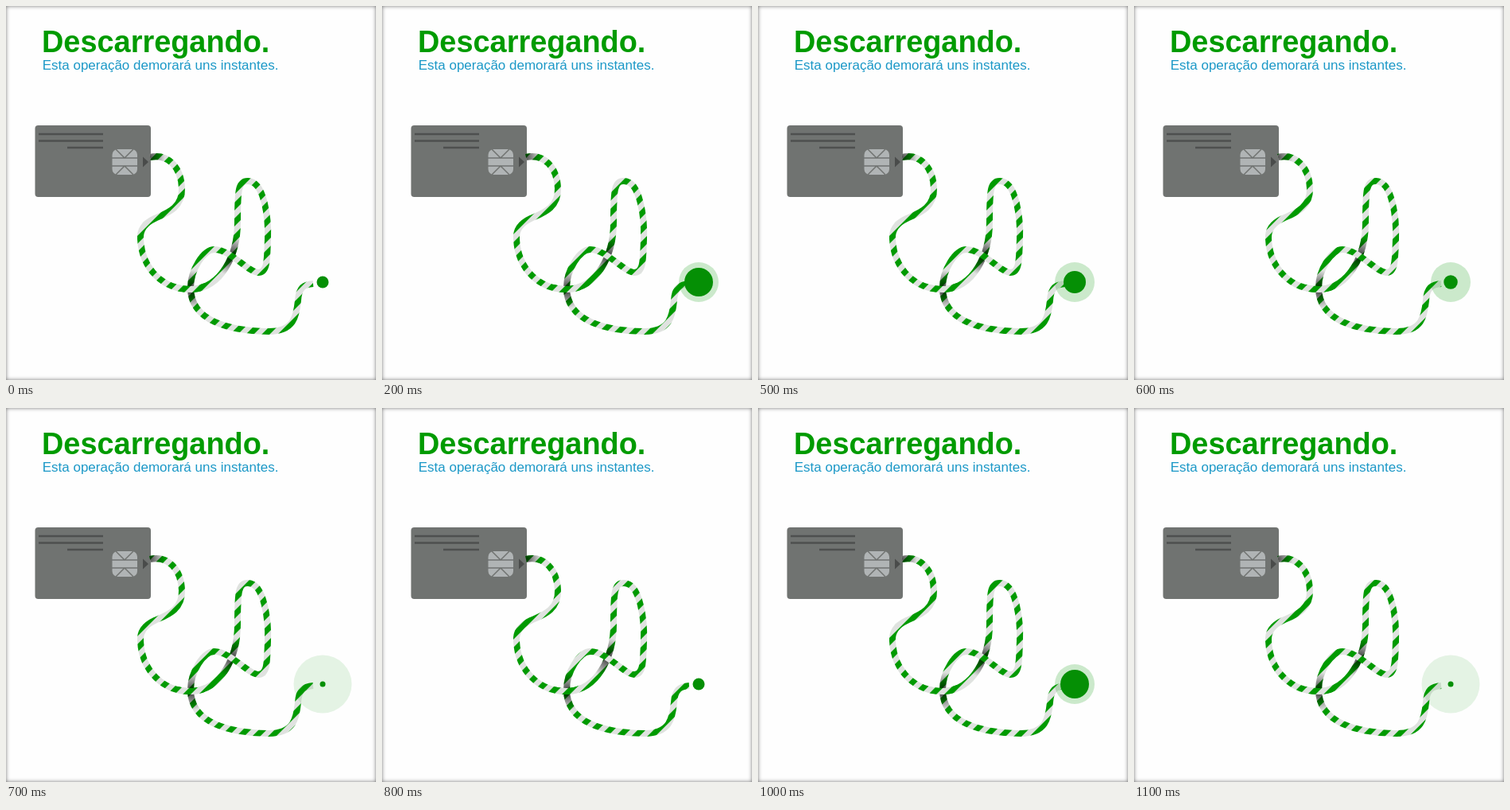
An HTML page for the animation above (1.2 s loop, 465x470 px).

```html
<!DOCTYPE html>
<html lang="pt">
<head>
<meta charset="utf-8">
<title>Descarregando</title>
<style>
html, body { margin: 0; width: 100%; height: 100%; overflow: hidden; background: #fefefe; }
svg, .edge { position: absolute; left: 0; top: 0; width: 465px; height: 470px; }
.edge { box-shadow: inset 0 0 5px rgba(0,0,0,.55); }
text { font-family: "Liberation Sans", Arial, sans-serif; }
.rope { fill: none; stroke-width: 8; }
</style>
</head>
<body>
<svg viewBox="0 0 465 470">
  <defs>
    <!-- Diagonal stripes, fixed to the stage and seen through the rope -->
    <linearGradient id="stripes" gradientUnits="userSpaceOnUse" x2="10" y2="10" spreadMethod="repeat">
      <stop offset=".23" stop-color="#dfe2df"/>
      <stop offset=".27" stop-color="#009a00"/>
      <stop offset=".73" stop-color="#009a00"/>
      <stop offset=".77" stop-color="#dfe2df"/>
    </linearGradient>
    <radialGradient id="shadeCard" gradientUnits="userSpaceOnUse" cx="181" cy="190" r="19">
      <stop stop-opacity=".65"/><stop offset="1" stop-opacity="0"/>
    </radialGradient>
    <radialGradient id="shadeLoop" gradientUnits="userSpaceOnUse" cx="284" cy="314" r="25">
      <stop stop-opacity=".75"/><stop offset="1" stop-opacity="0"/>
    </radialGradient>
    <radialGradient id="shadeCross" gradientUnits="userSpaceOnUse" cx="233" cy="356" r="24">
      <stop stop-opacity=".75"/><stop offset="1" stop-opacity="0"/>
    </radialGradient>
    <path id="head" d="M181 190C204 185 220 203 221 229S200 261 187 267S168 281 169 293
      C171 331 198 357 234 356C270 354 291 314 291 272S292 219 305 220"/>
    <path id="tail" d="M304 220C325 220 330 268 329 293S329 335 317 335S282 306 262 306
      C248 306 232 332 232 354C232 396 280 408 330 409C362 409 365 390 367 370C368 354 374 350 386 349"/>
    <clipPath id="crossing"><rect x="216" y="340" width="34" height="24"/></clipPath>
  </defs>

  <text x="45" y="58" font-size="37.9" font-weight="bold" fill="#009b00">Descarregando.</text>
  <text x="45.7" y="80" font-size="17" fill="#1b98c7">Esta operação demorará uns instantes.</text>

  <rect x="36.5" y="150" width="145.5" height="90" rx="4" fill="#707371"/>
  <path d="M41 161H122M41 169.5H122M77 178H122" stroke="#4e504f" stroke-width="2.4"/>
  <rect x="133.5" y="180" width="31.5" height="32" rx="7" fill="#b0b4b5"/>
  <path d="M133 191H165M133 201H165M138 180L149 191L160 180M138 212L149 201L160 212" fill="none" stroke="#707371" stroke-width="1.5"/>
  <path d="M172 189.5L179 196L172 202.5Z" fill="#4a4c4b"/>

  <g class="rope">
    <use href="#head" stroke="url(#stripes)"/>
    <use href="#head" stroke="url(#shadeCard)"/>
    <use href="#head" stroke="url(#shadeLoop)"/>
    <use href="#tail" stroke="url(#stripes)"/>
    <use href="#tail" stroke="url(#shadeCross)"/>
    <g clip-path="url(#crossing)"><use href="#head" stroke="url(#stripes)"/></g>
  </g>

  <circle id="halo" cx="398" cy="347" fill="#009600"/>
  <circle id="disc" cx="398" cy="347" fill="#058f05"/>
</svg>
<div class="edge"></div>
<script>
const STEPS = 12, BEATS = 8, RATE = 5.25;
const [stripes, halo, disc] = ['stripes', 'halo', 'disc'].map(id => document.getElementById(id));

function draw(now) {
  const step = Math.floor(now / 100) % STEPS;
  stripes.setAttribute('gradientTransform', `translate(${9 + 4 * step} 0)`);

  // The disc swells and shrinks; the loop ends on the burst of a shortened pulse.
  const beat = step === STEPS - 1 ? BEATS - 1 : step % BEATS;
  const burst = beat === BEATS - 1;
  disc.setAttribute('r', Math.min(7.5 + RATE * beat, 20, 3.5 + RATE * (BEATS - 1 - beat)));
  halo.setAttribute('r', burst ? 36.5 : beat > 1 ? 25 : 0);
  halo.setAttribute('opacity', burst ? .1 : .2);
  requestAnimationFrame(draw);
}
draw(performance.now());
</script>
</body>
</html>
```
